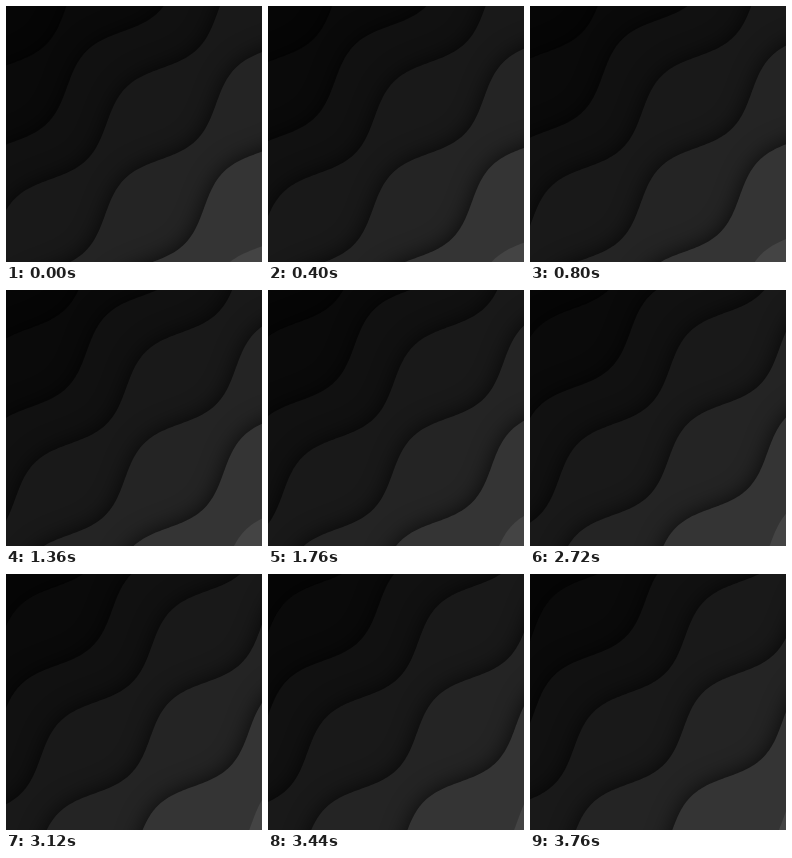
An HTML page with a canvas for the animation above (3.84 s loop, 256x256 px).

```html
<!DOCTYPE html>
<html>
<head>
<meta charset="utf-8">
<style>
  html, body { margin: 0; height: 100%; overflow: hidden; background: #060606; }
  canvas { display: block; }
</style>
</head>
<body>
<canvas width="256" height="256"></canvas>
<script>
const ctx = document.querySelector('canvas').getContext('2d');
const LOOP = 3840, STEP = 80;
const PERIOD = 222, AMPLITUDE = 16.5;
const SPEED = PERIOD / 2 / LOOP; // half a wave per loop, then a jump back

// Layers from back to front: distance along x + y, wave phase, grey level
const layers = [
  { base: 62, phase: 57, grey: 10 },
  { base: 142, phase: -20, grey: 17 },
  { base: 218, phase: -17, grey: 25 },
  { base: 308, phase: -110, grey: 36 },
  { base: 400, phase: -4, grey: 52 },
  { base: 496, phase: -96, grey: 68, blur: 0 }
];

function drawLayer({ base, phase, grey, blur = 22 }, time) {
  ctx.beginPath();
  // s runs along the diagonal x - y, u across it
  for (let s = -420; s <= 420; s += 3) {
    const angle = 2 * Math.PI * (s - phase - time * SPEED) / PERIOD;
    const u = base - AMPLITUDE * Math.sin(angle);
    ctx.lineTo((u + s) / 2, (u - s) / 2);
  }
  ctx.lineTo(700, 280);
  ctx.lineTo(700, 700);
  ctx.lineTo(280, 700);
  ctx.shadowBlur = blur;
  ctx.fillStyle = `rgb(${grey}, ${grey}, ${grey})`;
  ctx.fill();
}

function frame(now) {
  const time = Math.floor(now % LOOP / STEP) * STEP;
  ctx.shadowColor = 'transparent';
  ctx.fillStyle = '#060606';
  ctx.fillRect(0, 0, 256, 256);
  ctx.shadowColor = 'rgba(0, 0, 0, 0.75)';
  for (const layer of layers) drawLayer(layer, time);
  requestAnimationFrame(frame);
}
requestAnimationFrame(frame);
</script>
</body>
</html>
```
